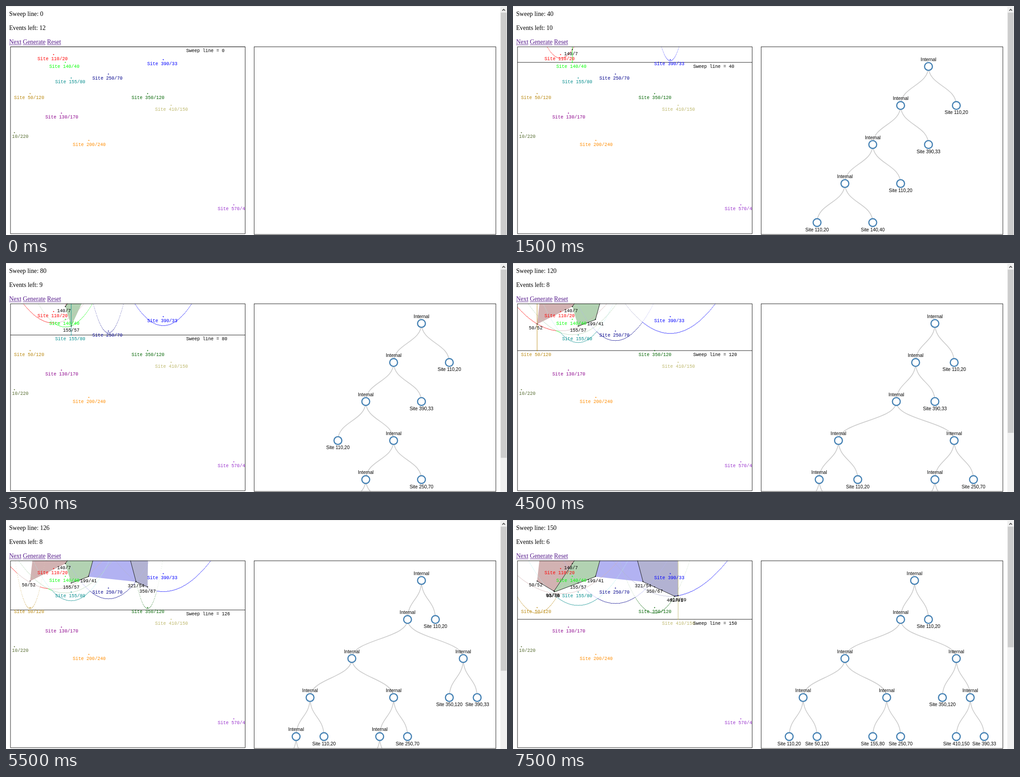
An HTML page with a canvas for the animation above (8000 ms loop, 1105 by 507 pixels).

```html
<!DOCTYPE html>
<html>
<head>
<meta charset="utf-8">
<title>Sweep line</title>
<style>
html, body { margin: 0; width: 100%; height: 100%; overflow: hidden; background: #fff; }
canvas { display: block; }
</style>
</head>
<body>
<canvas id="stage" width="1105" height="507"></canvas>
<script>
const ctx = document.getElementById('stage').getContext('2d');
// The page is laid out 1279 units wide and shown scaled down
const PAGE_W = 1279, SCALE = 1105 / PAGE_W, PAGE_H = 507 / SCALE;
const STEP_MS = 500;
const plot = { x: 11, y: 104, w: 600, h: 480 };
const panel = { x: 633, y: 104, w: 618, h: 482 };

// x, y, colour, pale tint
const sites = [
  [110, 20, '#ff0000', '#d2b2b2'],
  [390, 33, '#0000ff', '#b2b2d2'],
  [140, 40, '#00ff00', '#b2d2b2'],
  [250, 70, '#00008b', '#b2b2f2'],
  [155, 80, '#008b8b', '#b2eeee'],
  [50, 120, '#b8860b', '#e2d2b2'],
  [350, 120, '#006400', '#b2d2b2'],
  [410, 150, '#bdb76b', '#e4e2c6'],
  [130, 170, '#8b008b'],
  [10, 220, '#556b2f'],
  [200, 240, '#ff8c00'],
  [570, 405, '#9932cc']
].map(([x, y, color, pale]) => ({ x, y, color, pale }));

// sweep position, events left, leaf index, site to insert there (none = remove the leaf)
const events = [
  [0, 12], [20, 11, 0, 0], [33, 10, 0, 1], [40, 10, 0, 2],
  [70, 10, 1, 3], [71, 9, 3], [71, 8, 3], [80, 9, 1, 4],
  [100, 8, 3], [120, 8, 0, 5], [120, 8, 6, 6], [126, 8, 6],
  [138, 7, 2], [140, 7, 2], [150, 7, 5, 7], [150, 6, 5]
];

// x, y, step of appearance
const points = {
  a: [140, 7.5, 3], b: [155, 57.2, 7], c: [199, 40.7, 8], d: [50, 52, 9],
  e: [350, 67.3, 10], f: [320.6, 53.8, 11], g: [93.1, 77.9, 12],
  h: [94.8, 79.8, 13], i: [410, 89.8, 14], j: [401.9, 91.2, 15],
  p: [255, -165, 5], q: [259.5, -177.5, 6], r: [390, -2989, 2], s: [250, -147, 4]
};
const pointLabels = {
  a: '140/7', b: '155/57', c: '199/41', d: '50/52', e: '350/67',
  f: '321/54', g: '93/78', h: '95/80', i: '410/89', j: '402/91'
};
const edges = ['ap', 'pq', 'bc', 'cp', 'fq', 'fe', 'dg', 'ga', 'gh', 'hb', 'ej', 'ji'];
// owning site and corners in order; corners join once they exist
const cells = [[0, 'dgapqr'], [2, 'aghbcsp'], [3, 'cfqp'], [1, 'fejirq']];

function leavesOf(node, parent, out = []) {
  if (!node) return out;
  if (node.kids) node.kids.forEach(k => leavesOf(k, node, out));
  else out.push({ node, parent });
  return out;
}

function replay(step) {
  let root = null;
  for (let i = 1; i <= step; i++) {
    const [, , index, added] = events[i];
    const site = sites[added];
    if (!root) { root = { site }; continue; }
    const { node, parent } = leavesOf(root)[index];
    if (site) {
      const old = node.site;
      delete node.site;
      node.kids = [{ kids: [{ site: old }, { site }] }, { site: old }];
    } else {
      const sibling = parent.kids.find(k => k !== node);
      delete parent.kids;
      Object.assign(parent, sibling);
    }
  }
  return root;
}

// Tidy binary layout; returns [min, max] per depth relative to the node
function contour(node) {
  if (!node.kids) return [[0, 0]];
  const [l, r] = node.kids.map(contour);
  let gap = 1;
  for (let d = 1; d < Math.min(l.length, r.length); d++)
    gap = Math.max(gap, l[d][1] - r[d][0] + 2);
  node.half = gap / 2;
  const rows = [[0, 0]];
  for (let d = 0; d < Math.max(l.length, r.length); d++) {
    const a = l[d] && l[d].map(v => v - node.half);
    const b = r[d] && r[d].map(v => v + node.half);
    rows.push([(a || b)[0], (b || a)[1]]);
  }
  return rows;
}

function place(node, x, y, unit) {
  node.x = x;
  node.y = y;
  if (node.kids) node.kids.forEach((kid, i) =>
    place(kid, x + (i ? 1 : -1) * node.half * unit, y + 100, unit));
}

function layout(step) {
  const root = replay(step);
  if (!root) return null;
  const rows = contour(root);
  const min = Math.min(...rows.map(r => r[0]));
  const max = Math.max(...rows.map(r => r[1]));
  const unit = 640 / (max - min + 2);
  place(root, (1 - min) * unit, 50, unit);
  return root;
}

function box(x, y, w, h, color) {
  ctx.fillStyle = color;
  ctx.fillRect(x, y, w, h);
}

function text(str, x, y, font, color = '#000', align = 'left') {
  ctx.font = font;
  ctx.fillStyle = color;
  ctx.textAlign = align;
  ctx.fillText(str, x, y);
}

// Runs draw with the origin at (x, y), clipped to the given rectangle
function inside({ x, y, w, h }, inset, draw) {
  ctx.save();
  ctx.beginPath();
  ctx.rect(x + inset, y + inset, w - 2 * inset, h - 2 * inset);
  ctx.clip();
  ctx.translate(x + inset, y + inset);
  draw();
  ctx.restore();
}

function frame({ x, y, w, h }) {
  ctx.strokeStyle = '#000';
  ctx.lineWidth = 1;
  ctx.strokeRect(x + 0.5, y + 0.5, w - 1, h - 1);
}

function drawHeader(sweep, left) {
  const font = '16px "Liberation Serif", "Times New Roman", serif';
  text('Sweep line: ' + sweep, 8, 25, font);
  text('Events left: ' + left, 8, 61, font);
  let x = 8;
  for (const word of ['Next', 'Generate', 'Reset']) {
    text(word, x, 97, font, '#551a8b');
    const w = ctx.measureText(word).width;
    ctx.fillRect(x, 99, w, 1);
    x += w + 4;
  }
}

const mono = '11.67px "Liberation Mono", monospace';
const LABEL_DROP = 14.5;

function marker(x, y, color) {
  const mx = Math.floor(x), my = Math.floor(y);
  box(mx - 1, my, 3, 1, color);
  box(mx, my - 1, 1, 3, color);
}

function drawBeach(active, sweep) {
  const curved = active.filter(s => s.y < sweep);
  for (let x = 0; x < plot.w; x++) {
    const heights = curved.map(s =>
      ((x - s.x) ** 2 + s.y ** 2 - sweep ** 2) / (2 * (s.y - sweep)));
    const front = Math.max(...heights);
    const dots = (isFront, tone) => curved.forEach((s, i) => {
      if (heights[i] >= 0 && (heights[i] === front) === isFront)
        box(x, Math.floor(heights[i]), 1, 1, s[tone]);
    });
    dots(false, 'pale');
    dots(true, 'color');
  }
  for (const s of active) if (s.y === sweep) box(s.x, 0, 1, s.y, s.color);
}

function trace(names) {
  ctx.beginPath();
  for (const n of names) ctx.lineTo(points[n][0] + 0.5, points[n][1] + 0.5);
}

function drawDiagram(step, sweep, root) {
  const known = n => points[n][2] <= step;
  const active = [...new Set(leavesOf(root).map(l => l.node.site))];
  for (const [owner, names] of cells) {
    // an edge-start point merges into its edge once the far end is found
    const corners = [...names].filter(n => known(n) &&
      !(n === 'e' && step >= 15) && !(n === 's' && step >= 8));
    if (corners.length < 3) continue;
    trace(corners);
    ctx.fillStyle = sites[owner].pale;
    ctx.fill();
  }
  drawBeach(active, sweep);
  ctx.strokeStyle = '#000';
  ctx.lineWidth = 1;
  for (const edge of edges) if ([...edge].every(known)) {
    trace(edge);
    ctx.stroke();
  }
  box(0, sweep, plot.w, 1, '#000');
  for (const s of sites) {
    marker(s.x, s.y, s.color);
    text(`Site ${s.x}/${s.y}`, s.x - 40.5, s.y + LABEL_DROP, mono, s.color);
  }
  for (const n in pointLabels) if (known(n)) {
    const [x, y] = points[n];
    marker(x, y, '#000');
    text(pointLabels[n], x - 20.5, y + LABEL_DROP, mono);
  }
  text('Sweep line = ' + sweep, 449, sweep + LABEL_DROP, mono);
}

function drawLinks(node) {
  if (!node.kids) return;
  ctx.strokeStyle = '#ccc';
  ctx.lineWidth = 2;
  for (const kid of node.kids) {
    const mid = (node.y + kid.y) / 2;
    ctx.beginPath();
    ctx.moveTo(node.x, node.y);
    ctx.bezierCurveTo(node.x, mid, kid.x, mid, kid.x, kid.y);
    ctx.stroke();
    drawLinks(kid);
  }
}

function drawNodes(node) {
  ctx.beginPath();
  ctx.arc(node.x, node.y, 10, 0, 7);
  ctx.fillStyle = '#fff';
  ctx.fill();
  ctx.strokeStyle = 'steelblue';
  ctx.lineWidth = 3;
  ctx.stroke();
  const label = node.kids ? 'Internal' : `Site ${node.site.x},${node.site.y}`;
  text(label, node.x, node.y + (node.kids ? -14 : 22),
    '12px "Liberation Sans", Arial, sans-serif', '#000', 'center');
  if (node.kids) node.kids.forEach(drawNodes);
}

// The page grows with every step, so the thumb shrinks as its reciprocal
function thumbLength(step) {
  if (step < 6) return PAGE_H;
  const inverse = step < 11 ? 0.0024 + (step - 7) * 0.000184
                            : 0.003135 + (step - 11) * 0.0001525;
  return 1 / inverse / SCALE;
}

function drawScrollbar(step) {
  box(1262, 0, 17, PAGE_H, '#f0f0f0');
  box(1263, 17, 15, thumbLength(step), '#cdcdcd');
  ctx.strokeStyle = '#505050';
  ctx.lineWidth = 2;
  ctx.beginPath();
  ctx.moveTo(1267, 12);
  ctx.lineTo(1270.5, 8.5);
  ctx.lineTo(1274, 12);
  ctx.stroke();
}

function render(step) {
  const [sweep, left] = events[step];
  const root = layout(step);
  ctx.setTransform(SCALE, 0, 0, SCALE, 0, 0);
  box(0, 0, PAGE_W, PAGE_H + 1, '#fff');
  box(0, 0, 1262, 1, '#dedede');
  drawHeader(sweep, left);
  inside(plot, 0, () => drawDiagram(step, sweep, root));
  frame(plot);
  if (root) inside(panel, 1, () => {
    drawLinks(root);
    drawNodes(root);
  });
  frame(panel);
  drawScrollbar(step);
}

let shown = -1;
function tick() {
  const step = Math.floor(performance.now() / STEP_MS) % events.length;
  if (step !== shown) render(shown = step);
  requestAnimationFrame(tick);
}
tick();
</script>
</body>
</html>
```
